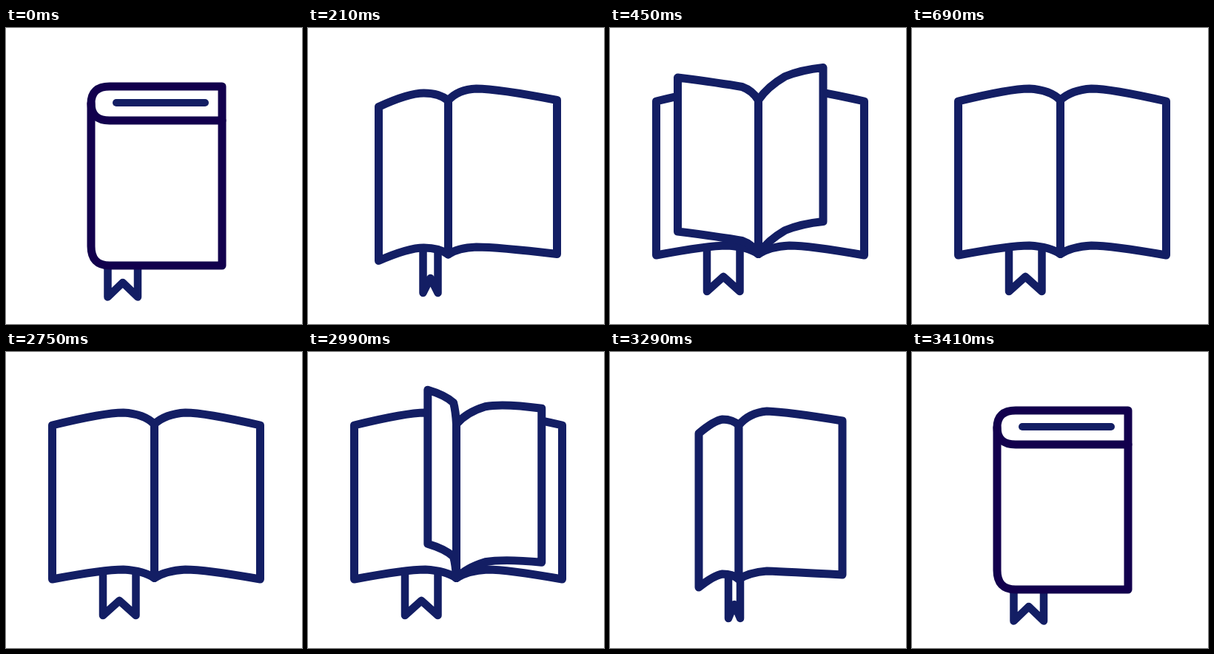
An HTML page with a canvas that plays this animation: 400x400 px, repeating every 4440 ms.

```html
<!DOCTYPE html>
<html lang="en">
<head>
<meta charset="utf-8">
<title>Book opening and closing</title>
<style>
  html, body { margin: 0; width: 100%; height: 100%; overflow: hidden; background: #fff; }
  canvas { display: block; width: 100%; height: 100%; object-fit: contain; }
</style>
</head>
<body>
<canvas id="stage" width="400" height="400"></canvas>
<script>
const ctx = document.getElementById('stage').getContext('2d');
const LOOP = 4440, STEP = 30, LAST = 23, CLOSE_AT = 2750;
const DARK = [18, 0, 77], BLUE = [19, 30, 100];

// Sheet pose, relative to the spine: bend x,y, shoulder x,y, bend x,y, edge x,y, extra bottom drop
const FLAT_RIGHT = [15, -14, 42, -15.5, 68, -15.5, 143, 1.5, 4];
const FLAT_LEFT = [-14, -14, -42, -15.5, -68, -15.5, -138, 1.5, 4];
const TURN = [
  { at: 0, pose: FLAT_RIGHT },
  { at: 2, pose: [12, -18, 36, -32, 58, -41, 87.5, -44, 0] },
  { at: 3.1, pose: [3, -20, 6, -35, 5, -48, 0, -55, 0] },
  { at: 4.65, pose: [-8, -13, -22, -18, -50, -23, -109, -30.5, 0] },
  { at: 6, pose: FLAT_LEFT }
];
const TURN_STARTS = [10.35, 13, 15.9];

// spine: x, top, bottom; mark: left, right, foot, notch
const BOOK = [
  { at: 4, spine: [174, 99, 307], left: [-8, -8, -22, -8, -34, -6, -54, 11, 1],
    right: [14, -17, 38, -19, 66, -18, 140, -6, 8], mark: [160, 176, 360, 341] },
  { at: 7, spine: [189.5, 98, 306], left: [-12, -10, -33, -10, -54, -10, -94, 8.5, 1],
    right: [13, -15, 38, -16, 66, -16, 147, -0.5, 6], mark: [155.5, 175.5, 358, 338] },
  { at: 10, spine: [200.5, 97.5, 305.5], left: FLAT_LEFT,
    right: FLAT_RIGHT, mark: [131, 175.5, 356, 336] }
];
const CLOSED_MARK = [137.5, 178, 363.5, 344];

const mix = (a, b, p) => a.map((v, i) => v + (b[i] - v) * p);

function sample(keys, at, name) {
  const i = keys.findIndex(key => key.at >= at);
  if (i < 0) return keys[keys.length - 1][name];
  if (i === 0) return keys[0][name];
  const a = keys[i - 1], b = keys[i];
  return mix(a[name], b[name], (at - a.at) / (b.at - a.at));
}

function draw(d, filled, width = 11) {
  const path = new Path2D(d);
  if (filled) ctx.fill(path);
  ctx.lineWidth = width;
  ctx.stroke(path);
}

function drawSheet([x, top, bottom], pose) {
  const [ax, ay, hx, hy, bx, by, ex, ey, drop] = pose;
  const low = bottom + drop;
  draw(`M${x} ${top}Q${x + ax} ${top + ay} ${x + hx} ${top + hy}` +
    `Q${x + bx} ${top + by} ${x + ex} ${top + ey}V${bottom + ey}` +
    `Q${x + bx} ${low + by} ${x + hx} ${low + hy}` +
    `Q${x + ax} ${low + ay} ${x} ${bottom}Z`, true);
}

function drawMark([left, right, foot, notch]) {
  draw(`M${left} 298V${foot}L${(left + right) / 2} ${notch}L${right} ${foot}V298`, false, 10.5);
}

function setInk(p) {
  ctx.strokeStyle = `rgb(${mix(DARK, BLUE, p).join()})`;
}

function drawClosed(p) {
  const right = 292 + 22 * p, fold = 125 - 22 * p, mid = (79 + fold) / 2;
  const foot = 321 - 9 * p, left = 115 + 5 * p;
  setInk(1);
  drawMark(mix(CLOSED_MARK, BOOK[0].mark, p));
  setInk(p);
  draw(`M${right} 79H140Q${left} 79 ${left} ${mid}V${foot - 26}` +
    `Q${left} ${foot} 140 ${foot}H${right}Z`, true);
  draw(`M${left} ${mid}Q${left} ${fold} 140 ${fold}H${right}`);
  if (p > 0) draw(`M${115 + 59 * p} ${fold}V${foot}`);
  setInk(1);
  if (p < 0.5) draw(`M${149 + 60 * p} ${mid - 1}H${269 + 20 * p}`, false, 10);
}

function drawOpen(step) {
  const spine = sample(BOOK, step, 'spine');
  setInk(1);
  drawMark(sample(BOOK, step, 'mark'));
  drawSheet(spine, sample(BOOK, step, 'left'));
  drawSheet(spine, sample(BOOK, step, 'right'));
  for (const start of TURN_STARTS) {
    const turn = step - start;
    if (turn > 0 && turn < 6) drawSheet(spine, sample(TURN, turn, 'pose'));
  }
}

function stepAt(time) {
  if (time < CLOSE_AT) return Math.min(LAST, Math.floor(time / STEP));
  return Math.max(0, LAST - 1 - Math.floor((time - CLOSE_AT) / STEP));
}

function render(time) {
  const step = stepAt(time % LOOP);
  ctx.fillStyle = '#fff';
  ctx.fillRect(0, 0, 400, 400);
  ctx.lineCap = ctx.lineJoin = 'round';
  if (step < 4) drawClosed(step / 4);
  else drawOpen(step);
}

const began = performance.now();
function tick() {
  render(performance.now() - began);
  requestAnimationFrame(tick);
}
tick();
</script>
</body>
</html>
```
